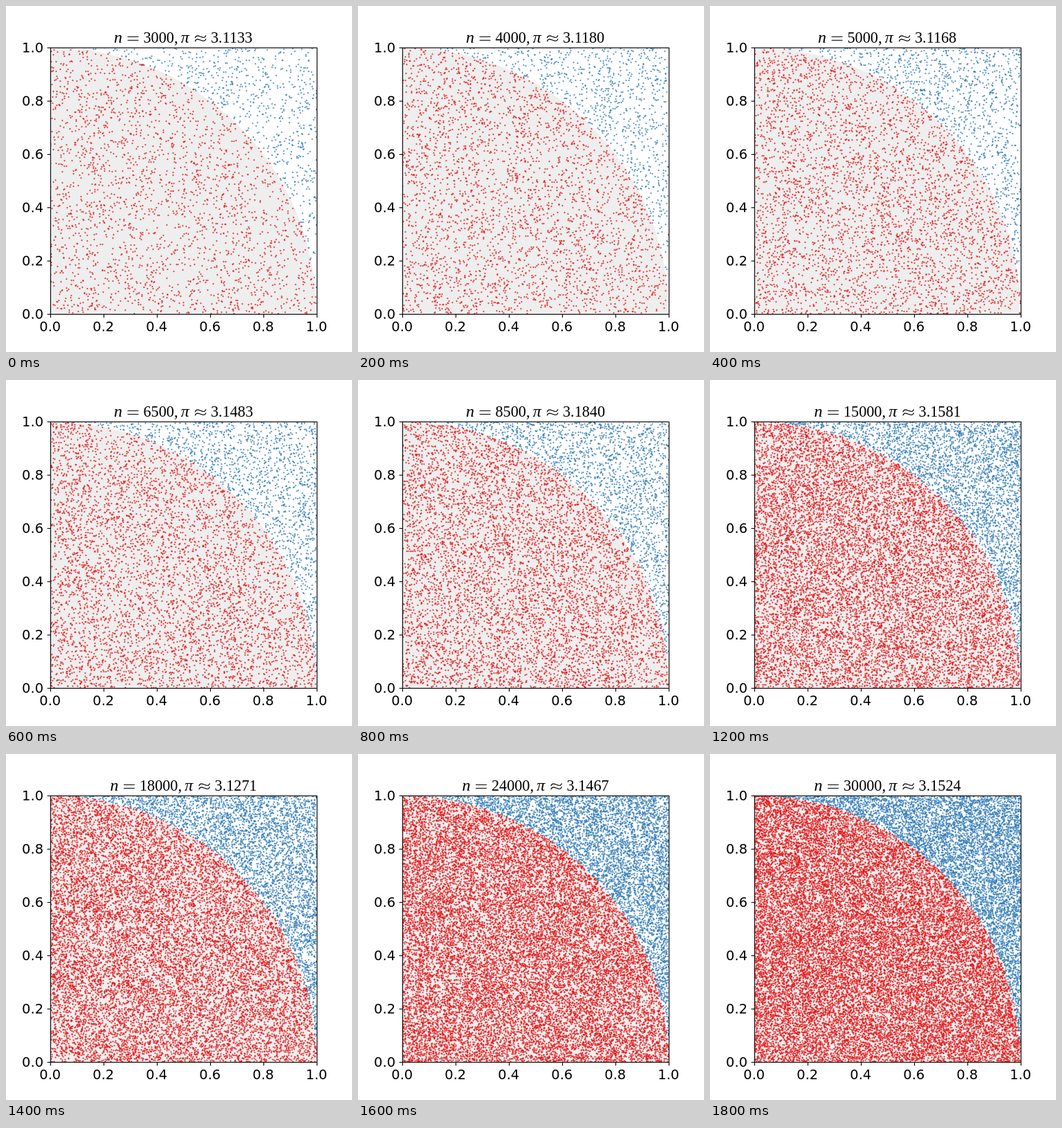
Recreate the animation shown at these times as an HTML page with a canvas. Size 500 by 500 pixels, loop 2000 ms.

```html
<!DOCTYPE html>
<html lang="en">
<head>
<meta charset="utf-8">
<title>Monte Carlo estimate of pi</title>
<style>
  html, body { margin: 0; width: 100%; height: 100%; overflow: hidden; background: #fff; }
  canvas { display: block; }
</style>
</head>
<body>
<canvas id="stage" width="500" height="500"></canvas>
<script>
const ctx = document.getElementById('stage').getContext('2d');
const STEP = 200;
const LEFT = 63.75, TOP = 60, SIZE = 385, BOTTOM = TOP + SIZE;
const EM = 22.2, BASELINE = 52.5;

const runs = [
  [3000, '3.1133'], [4000, '3.1180'], [5000, '3.1168'], [6500, '3.1483'], [8500, '3.1840'],
  [12000, '3.1407'], [15000, '3.1581'], [18000, '3.1271'], [24000, '3.1467'], [30000, '3.1524']
];

function makeRandom(seed) {
  return () => {
    seed = (seed + 0x6D2B79F5) | 0;
    let t = Math.imul(seed ^ (seed >>> 15), seed | 1);
    t ^= t + Math.imul(t ^ (t >>> 7), t | 61);
    return ((t ^ (t >>> 14)) >>> 0) / 4294967296;
  };
}

function makeDot(color) {
  const dot = document.createElement('canvas');
  dot.width = dot.height = 3;
  const c = dot.getContext('2d');
  c.fillStyle = color;
  c.arc(1.5, 1.5, 1.04, 0, 2 * Math.PI);
  c.fill();
  return dot;
}
const redDot = makeDot('#e41a1c'), blueDot = makeDot('#377eb8');

function line(...points) {
  ctx.beginPath();
  points.forEach(([x, y]) => ctx.lineTo(x, y));
  ctx.stroke();
}

function drawPoints(count, seed) {
  const random = makeRandom(seed);
  ctx.save();
  ctx.beginPath();
  ctx.rect(64, TOP, 386, 386);
  ctx.clip();
  ctx.fillStyle = '#eee';
  ctx.beginPath();
  ctx.moveTo(LEFT, BOTTOM);
  ctx.arc(LEFT, BOTTOM, SIZE, -Math.PI / 2, 0);
  ctx.fill();
  for (let i = 0; i < count; i++) {
    const x = random(), y = random();
    const dot = x * x + y * y < 1 ? redDot : blueDot;
    ctx.drawImage(dot, Math.floor(LEFT + x * SIZE) - 1, Math.floor(BOTTOM - y * SIZE) - 1);
  }
  ctx.restore();
}

function drawAxes() {
  ctx.strokeStyle = ctx.fillStyle = '#000';
  ctx.lineWidth = 1.11;
  ctx.strokeRect(64.5, 60.5, 385, 385);
  ctx.font = '19.44px "DejaVu Sans", sans-serif';
  for (let i = 0; i <= 5; i++) {
    const label = (i / 5).toFixed(1), offset = i * SIZE / 5;
    const x = Math.round(LEFT + offset) + 0.5, y = BOTTOM - offset + 0.5;
    line([x, 445.5], [x, 450.4]);
    line([64.5, y], [59.6, y]);
    ctx.textAlign = 'center';
    ctx.fillText(label, LEFT + offset, 470);
    ctx.textAlign = 'right';
    ctx.fillText(label, 54, y + 6.5);
  }
}

function drawTitle(count, estimate) {
  const digits = String(count);
  const shift = (digits.length - 4) * EM / 4;
  const write = (text, x, style = '', size = EM) => {
    ctx.font = `${style} ${size}px "Liberation Serif", serif`;
    ctx.fillText(text, x, BASELINE);
  };
  ctx.textAlign = 'left';
  write('n', 156 - shift, 'italic', 24);
  write(digits + ',', 198.5 - shift);
  write('π', 252.8 + shift, 'italic', 24);
  write(estimate, 296 + shift);

  ctx.lineWidth = 1;
  for (const y of [44.5, 49.5]) line([175.7 - shift, y], [191.5 - shift, y]);
  ctx.lineWidth = 1.1;
  const x = 273.2 + shift;
  for (const y of [44.3, 49.3]) {
    ctx.beginPath();
    ctx.moveTo(x, y + 2);
    ctx.bezierCurveTo(x + 3, y - 7, x + 12.8, y + 7, x + 15.8, y - 2);
    ctx.stroke();
  }
}

let shown = -1;
function render() {
  const index = Math.floor(performance.now() / STEP) % runs.length;
  if (index !== shown) {
    shown = index;
    const [count, estimate] = runs[index];
    ctx.fillStyle = '#fff';
    ctx.fillRect(0, 0, 500, 500);
    drawPoints(count, index + 1);
    drawAxes();
    drawTitle(count, estimate);
  }
  requestAnimationFrame(render);
}
render();
</script>
</body>
</html>
```
